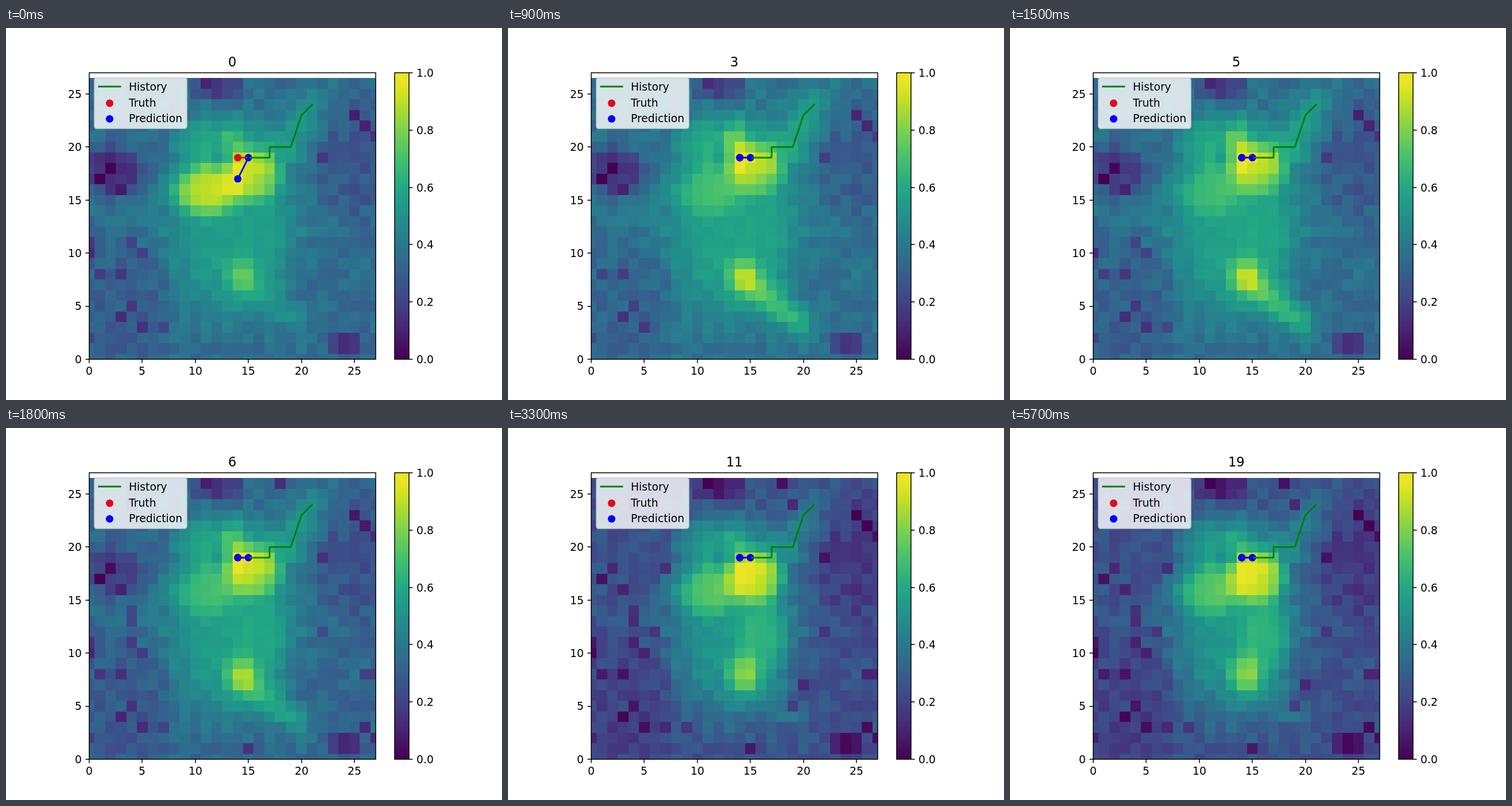
Recreate the animation shown at these times as an HTML page with a canvas. Size 864x648 px, loop 6000 ms.

```html
<!DOCTYPE html>
<html lang="en">
<head>
<meta charset="utf-8">
<title>Prediction heatmap</title>
<style>
  html, body { margin: 0; width: 100%; height: 100%; overflow: hidden; background: #fff; }
  canvas { display: block; }
</style>
</head>
<body>
<canvas id="stage" width="864" height="648"></canvas>
<script>
const ctx = document.getElementById('stage').getContext('2d');
const STEP = 300, STEPS = 20, COLS = 28, ROWS = 27;
const PT = 1.875; // pixels per point
const L = 145, T = 78, SIZE = 499, B = T + SIZE;
const UNIT = SIZE / 27;
const BAR = { x: 677, w: 25 };
const GREEN = '#008000', RED = '#e2081a', BLUE = '#0000ff';
const HISTORY = [[15, 19], [17, 19], [17, 20], [19, 20], [20, 23], [21, 24]];
const SPUR = [[14.5, 7.5], [19.6, 3.4]];
const TOP = .97; // brightest shade in use

const px = x => L + x * UNIT;
const py = y => B - y * UNIT;
const mix = (a, b, k) => a + (b - a) * k;
const clamp = (v, lo, hi) => Math.min(hi, Math.max(lo, v));

const VIRIDIS = ['#440154', '#482475', '#414487', '#355f8d', '#2a788e', '#21918c',
  '#22a884', '#44bf70', '#7ad151', '#bddf26', '#fde725']
  .map(h => [1, 3, 5].map(i => parseInt(h.slice(i, i + 2), 16)));

function color(v) {
  const p = clamp(v, 0, TOP) * 10, i = Math.min(9, Math.floor(p));
  const rgb = VIRIDIS[i].map((c, n) => Math.round(mix(c, VIRIDIS[i + 1][n], p - i)));
  return `rgb(${rgb})`;
}

function random(x, y, seed) {
  const s = Math.sin(x * 127.1 + y * 311.7 + seed * 74.7) * 43758.5453;
  return s - Math.floor(s);
}

// Flat-topped hill with soft edges
function hill(x, y, cx, cy, rx, ry) {
  const q = ((x - cx) / rx) ** 2 + ((y - cy) / ry) ** 2;
  return Math.exp(-q * q);
}

function distance(x, y, [ax, ay], [bx, by]) {
  const dx = bx - ax, dy = by - ay;
  const k = clamp(((x - ax) * dx + (y - ay) * dy) / (dx * dx + dy * dy), 0, 1);
  return Math.hypot(x - ax - k * dx, y - ay - k * dy);
}

function ridge(x, y, points, width) {
  const d = Math.min(...points.slice(1).map((p, i) => distance(x, y, points[i], p)));
  return Math.exp(-((d / width) ** 2));
}

// The field starts with a western lobe, flares along the paths, then settles.
function makeField(t) {
  const first = Math.exp(-t / 1.5);
  const flare = Math.exp(-(((t - 4) / 2.8) ** 2));
  const settled = clamp((t - 4) / 6, 0, 1);
  return (x, y) => {
    const at = (...shape) => hill(x, y, ...shape);
    const smooth = .35 + .03 * flare - .1 * settled
      + at(13.5, 13, 6.5, 9.5) * (.2 + .08 * settled)
      + at(15.4, 17.1 + .9 * flare, 2.6, 2.4) * (.3 - .08 * flare + .08 * settled)
      + at(11, 16, 3.2, 2.4) * (.1 + .26 * first + .12 * settled)
      + at(13.8, 20.3, 1.2, 2.6) * (.12 + .1 * flare)
      + at(10.8, 20.5, 2.8, 2.3) * .12
      + at(14.3, 8, 1.6, 2) * (.12 + .1 * settled)
      + at(16, 11.5, 2.4, 3.5) * .12 * settled
      + ridge(x, y, HISTORY, 1.8) * (.14 + .04 * flare)
      + ridge(x, y, SPUR, 1.4) * (.09 + .2 * flare)
      - at(2, 17.8, 3, 2.2) * .25 * (1 - settled)
      - at(12, 25.7, 2.2, 1.2) * .22
      - at(24.4, 1.5, 1.6, 1.2) * .25
      - at(25, 19, 3.5, 6) * .08
      - at(12.5, 19.3, .9, .9) * .12
      - at(3, 5, 4.5, 6) * .06;
    const rough = clamp((.75 - smooth) / .4, .3, 1);
    const speck = rough === 1 && random(x, y, 2) < .07 ? .16 : 0;
    return smooth + (random(x, y, 1) - .5) * .12 * rough - speck;
  };
}

function text(s, x, y, align = 0, size = 10) {
  ctx.font = `${size * PT}px "DejaVu Sans", sans-serif`;
  ctx.fillStyle = '#000';
  ctx.fillText(s, Math.round(x - ctx.measureText(s).width * align), Math.round(y));
}

function line(points, stroke, width = 1.5 * PT, cap = 'square') {
  ctx.beginPath();
  points.forEach(([x, y]) => ctx.lineTo(x, y));
  ctx.strokeStyle = stroke;
  ctx.lineWidth = width;
  ctx.lineCap = cap;
  ctx.lineJoin = 'round';
  ctx.stroke();
}

function dot(x, y, fill) {
  ctx.beginPath();
  ctx.arc(x, y, 6.56, 0, 7);
  ctx.fillStyle = fill;
  ctx.fill();
}

const path = (points, stroke) => line(points.map(([x, y]) => [px(x), py(y)]), stroke);

function tick(x, y, dx, dy) {
  const x0 = Math.round(x), y0 = Math.round(y);
  line([[x0, y0], [x0 + dx, y0 + dy]], '#000', 1.5, 'butt');
}

function frameBox(x, w) {
  ctx.strokeStyle = '#000';
  ctx.lineWidth = 1.5;
  ctx.lineJoin = 'miter';
  ctx.strokeRect(x, T, w, SIZE);
}

function drawCells(t) {
  const field = makeField(t);
  ctx.save();
  ctx.beginPath();
  ctx.rect(L, T, SIZE, SIZE);
  ctx.clip();
  for (let y = 0; y < ROWS; y++) {
    for (let x = 0; x < COLS; x++) {
      const x0 = Math.round(px(x - .5)), y0 = Math.round(py(y + .5));
      ctx.fillStyle = color(field(x, y));
      ctx.fillRect(x0, y0, Math.round(px(x + .5)) - x0, Math.round(py(y - .5)) - y0);
    }
  }
  ctx.restore();
}

function drawPaths(t) {
  const now = HISTORY[0], truth = [14, 19], guess = t === 0 ? [14, 17] : truth;
  dot(px(truth[0]), py(truth[1]), RED);
  for (const [x, y] of [now, guess]) dot(px(x), py(y), BLUE);
  path(HISTORY, GREEN);
  path([now, truth], RED);
  path([now, guess], BLUE);
}

function drawAxes() {
  frameBox(L, SIZE);
  for (let n = 0; n <= 25; n += 5) {
    tick(px(n), B, 0, 6.56);
    tick(L, py(n), -6.56, 0);
    text(n, px(n), 604, .5);
    text(n, 131.6, py(n) + 6.9, 1);
  }
}

function drawBar() {
  const bands = 128;
  for (let i = 0; i < bands; i++) {
    const y0 = Math.round(B - SIZE * (i + 1) / bands), y1 = Math.round(B - SIZE * i / bands);
    ctx.fillStyle = color(i / (bands - 1));
    ctx.fillRect(BAR.x, y0, BAR.w, y1 - y0);
  }
  frameBox(BAR.x, BAR.w);
  const edge = BAR.x + BAR.w;
  for (let i = 0; i <= 5; i++) {
    const y = B - SIZE * i / 5;
    tick(edge, y, 6.56, 0);
    text((i / 5).toFixed(1), edge + 13.1, y + 6.9);
  }
}

function drawLegend() {
  ctx.beginPath();
  ctx.roundRect(154, 87, 161, 88, 3.75);
  ctx.fillStyle = 'rgba(255,255,255,.8)';
  ctx.fill();
  ctx.strokeStyle = 'rgba(204,204,204,.8)';
  ctx.lineWidth = PT;
  ctx.stroke();
  line([[161.8, 102], [199, 102]], GREEN);
  dot(180.5, 131, RED);
  dot(180.5, 158.3, BLUE);
  ['History', 'Truth', 'Prediction'].forEach((s, i) => text(s, 214.3, 109 + i * 27.5));
}

function draw(t) {
  ctx.fillStyle = '#fff';
  ctx.fillRect(0, 0, 864, 648);
  drawCells(t);
  drawPaths(t);
  drawAxes();
  drawBar();
  drawLegend();
  text(t, L + SIZE / 2, 67, .5, 12);
}

const start = performance.now();
let shown = -1;
function animate(now) {
  const t = Math.floor(Math.max(0, now - start) / STEP) % STEPS;
  if (t !== shown) draw(shown = t);
  requestAnimationFrame(animate);
}
animate(start);
</script>
</body>
</html>
```
